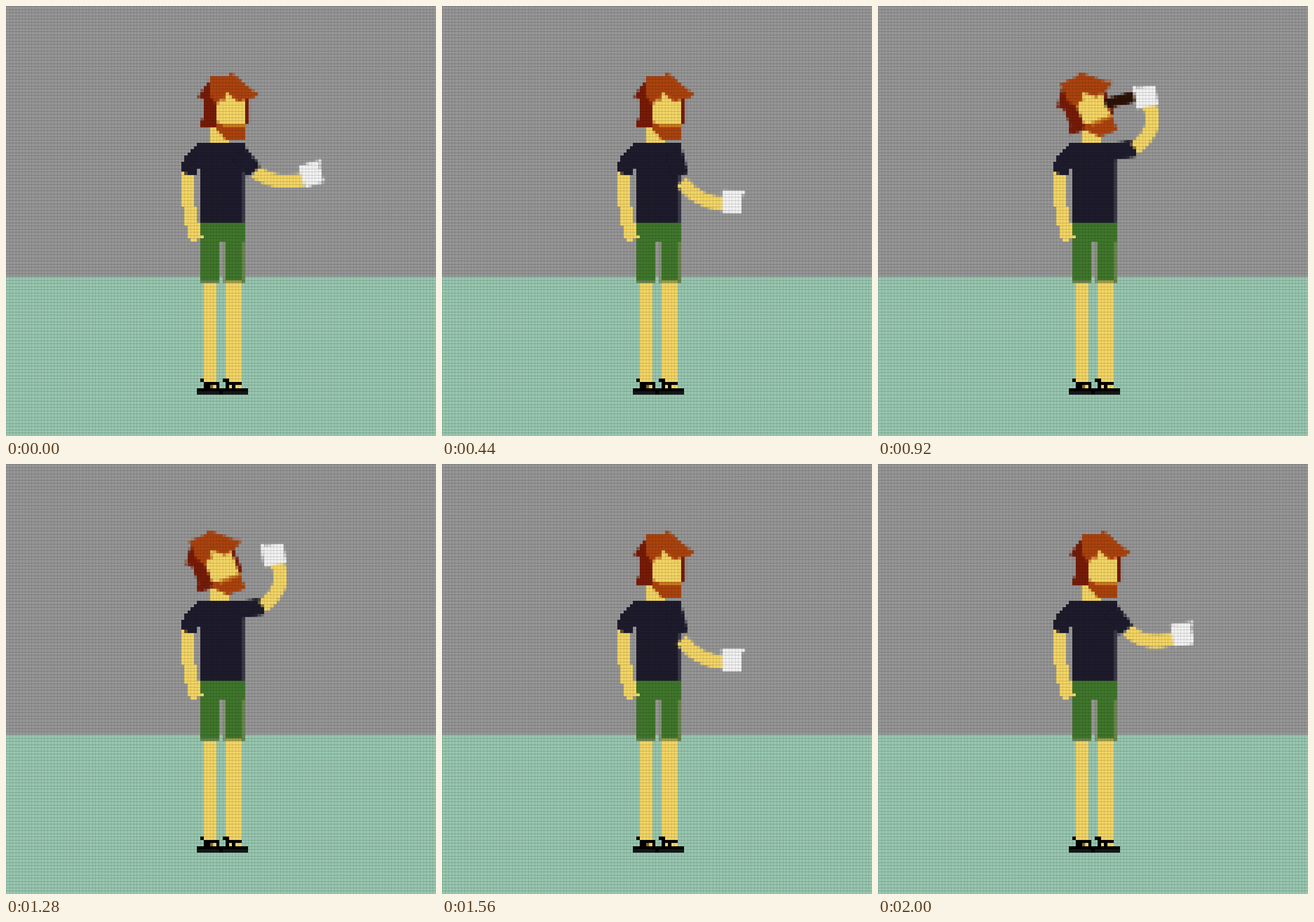
Animation of 748x748 px, one loop 2.48 s. Source, as an HTML page without scripts:

```html
<!DOCTYPE html>
<html lang="en">
<head>
<meta charset="utf-8">
<title>Coffee break</title>
<style>
  html, body { margin: 0; width: 100%; height: 100%; overflow: hidden; background: #9b9b9b; }
  svg { display: block; width: 748px; height: 748px; }

  .skin { fill: #fbdc68; }
  .shirt { fill: #1f1d2e; }
  .shorts { fill: #427a2d; }
  .hair { fill: #b1450e; }
  .back { fill: #7c1c08; }
  .lines { fill: none; stroke-width: 1496; stroke-dasharray: 1 4.5407; shape-rendering: crispEdges; }

  .sleeve, .arm, .pour { fill: none; }
  .sleeve { stroke: #1f1d2e; stroke-width: 28; }
  .arm { stroke: #fbdc68; stroke-width: 22; }
  .pour { stroke: #2e1206; stroke-width: 17; stroke-dasharray: 1 2; }
  .cup { fill: #f9f9f9; }
  .head { transform-origin: 66.7px 40.4px; }

  .head, .sleeve, .arm, .cup, .pour { animation: 2480ms linear infinite; }
  .head { animation-name: head; }
  .sleeve { animation-name: sleeve; }
  .arm { animation-name: arm; }
  .cup { animation-name: cup; }
  .pour { animation-name: pour; }

  /* rest, dip, lift, sip, lower, dip, back to rest */
  @keyframes sleeve {
    0%, 3.23% { d: path("M405 255L431 287"); animation-timing-function: ease-in-out; }
    14.5% { d: path("M404 255L410 294"); }
    17.74% { d: path("M404 255L413 294"); }
    24.19% { d: path("M402 255L443 271"); animation-timing-function: ease-out; }
    30.65%, 51.61% { d: path("M400 255L447 247"); animation-timing-function: ease-in; }
    56.45% { d: path("M402 255L443 271"); }
    62.9% { d: path("M404 255L413 294"); }
    66.13% { d: path("M404 255L410 294"); }
    69.35% { d: path("M404 255L420 292"); animation-timing-function: ease-out; }
    80.65%, 100% { d: path("M405 255L431 288"); }
  }
  @keyframes arm {
    0%, 3.23% { d: path("M435 288Q460 310 516 302"); animation-timing-function: ease-in-out; }
    14.5% { d: path("M412 304Q440 350 487 350"); }
    17.74% { d: path("M417 306Q445 343 490 344"); }
    24.19% { d: path("M443 274Q492 283 512 236"); animation-timing-function: ease-out; }
    30.65%, 51.61% { d: path("M446 247Q492 213 470 170"); animation-timing-function: ease-in; }
    56.45% { d: path("M443 274Q492 283 512 236"); }
    62.9% { d: path("M417 306Q445 343 490 344"); }
    66.13% { d: path("M412 304Q440 350 487 350"); }
    69.35% { d: path("M424 300Q450 336 500 332"); animation-timing-function: ease-out; }
    80.65%, 100% { d: path("M435 289Q465 318 516 303"); }
  }
  @keyframes cup {
    0%, 3.23% { transform: translate(531px, 292px) rotate(-15deg); animation-timing-function: ease-in-out; }
    14.5% { transform: translate(500px, 347px) rotate(5deg); }
    17.74% { transform: translate(504px, 341px) rotate(3deg); }
    24.19% { transform: translate(519px, 221px) rotate(-52deg); animation-timing-function: ease-out; }
    30.65%, 51.61% { transform: translate(465px, 158px) rotate(-98deg); animation-timing-function: ease-in; }
    56.45% { transform: translate(519px, 221px) rotate(-52deg); }
    62.9% { transform: translate(504px, 341px) rotate(0deg); }
    66.13% { transform: translate(500px, 347px) rotate(4deg); }
    69.35% { transform: translate(513px, 329px) rotate(-2deg); animation-timing-function: ease-out; }
    80.65%, 100% { transform: translate(529px, 296px) rotate(-9deg); }
  }
  @keyframes head {
    0%, 21% { transform: rotate(0deg); animation-timing-function: ease-in; }
    24.19% { transform: rotate(-4deg); }
    30.65% { transform: rotate(-20deg); }
    35%, 43% { transform: rotate(-22deg); }
    48%, 51.61% { transform: rotate(-21deg); animation-timing-function: ease-in; }
    56.45% { transform: rotate(-5deg); }
    59.68%, 100% { transform: rotate(0deg); }
  }
  @keyframes pour {
    0%, 32.26% { stroke-dashoffset: 1; }
    35.48%, 42% { stroke-dashoffset: 0; }
    46.77%, 100% { stroke-dashoffset: -1; }
  }
</style>
</head>
<body>
<svg viewBox="0 0 748 748">
  <defs>
    <path id="cols" class="lines" d="M0 0H748"/>
    <path id="rows" class="lines" d="M0 0V748"/>
    <mask id="pickX" maskUnits="userSpaceOnUse" x="0" y="0" width="748" height="748">
      <use href="#cols" stroke="#fff"/>
    </mask>
    <mask id="pickY" maskUnits="userSpaceOnUse" x="0" y="0" width="748" height="748">
      <use href="#rows" stroke="#fff"/>
    </mask>
    <filter id="soft" filterUnits="userSpaceOnUse" x="0" y="0" width="748" height="748" color-interpolation-filters="sRGB">
      <feGaussianBlur stdDeviation="1"/>
    </filter>
    <!-- grows each sampled dot to one 6px block -->
    <filter id="blocks" filterUnits="userSpaceOnUse" x="0" y="0" width="748" height="748" color-interpolation-filters="sRGB">
      <feOffset in="SourceGraphic" dx="1" result="o1"/>
      <feMerge result="x2"><feMergeNode in="o1"/><feMergeNode in="SourceGraphic"/></feMerge>
      <feOffset in="x2" dx="2" result="o2"/>
      <feMerge result="x4"><feMergeNode in="o2"/><feMergeNode in="x2"/></feMerge>
      <feOffset in="x4" dx="2" result="o3"/>
      <feMerge result="x6"><feMergeNode in="o3"/><feMergeNode in="x4"/></feMerge>
      <feOffset in="x6" dy="1" result="o4"/>
      <feMerge result="y2"><feMergeNode in="o4"/><feMergeNode in="x6"/></feMerge>
      <feOffset in="y2" dy="2" result="o5"/>
      <feMerge result="y4"><feMergeNode in="o5"/><feMergeNode in="y2"/></feMerge>
      <feOffset in="y4" dy="2" result="o6"/>
      <feMerge><feMergeNode in="o6"/><feMergeNode in="y4"/></feMerge>
    </filter>
  </defs>

  <g transform="scale(5.5407)" shape-rendering="crispEdges">
    <path fill="#9b9b9b" d="M0 0H136V85H0z"/>
    <path fill="#9ccdb5" d="M0 85H136V136H0z"/>

    <!-- legs and sandals -->
    <path class="skin" d="M62 87H66V119H62zM69 87H74V119H69z"/>
    <path d="M61 117h1v1h-1zM62 118H67V120H62zM68 117H70V118H68zM69 118H74V120H69zM60 120H76V122H60z"/>
    <path fill="#15181a" d="M60 121H67V122H60zM68 121H76V122H68z"/>
    <path class="skin" d="M65 119h1v1h-1zM70 119h1v1h-1zM72 119h2v1h-2z"/>
    <path fill="#8a6a2c" d="M64 119h1v1h-1z"/>

    <!-- shorts -->
    <path class="shorts" d="M61 68H75V74H74V86H69V74H67V86H61z"/>
    <path fill="#6c8a50" d="M74 74h1v13h-1zM61 86h6v1h-6z"/>
    <path fill="#a3a44a" d="M69 86h5v1h-5z"/>
    <path fill="#899a78" d="M68 74h1v13h-1z"/>

    <!-- left arm, neck, shirt -->
    <path class="skin" d="M55 52H59V63H60V68H61V72H62V73H60V74H58V73H57V69H56V63H55z"/>
    <path class="skin" d="M64 38H70V43H64z"/>
    <path class="shirt" d="M60 43H75V68H61V51H60V53H57V52H55V49H56V47H57V46H58V45H59V44H60z"/>
    <path fill="#3d3b4b" d="M74 47h1v21h-1z"/>
    <path fill="#5d4d32" d="M56 52h1v1h-1z"/>
  </g>

  <g filter="url(#blocks)">
    <g mask="url(#pickY)">
      <g mask="url(#pickX)">
        <g transform="translate(-2.3 -2.3)" filter="url(#soft)">
          <g transform="scale(5.5407)">
            <g class="head">
              <path class="back" d="M64 23.5L62 26L60.3 28.4L62 29.3V35L61 36.5V38H67L69 27L67 24zM74.5 29H76V37H74.5z"/>
              <path class="skin" d="M68 26.5H75V37.5H66V31z"/>
              <path class="hair" d="M64 22H70L70.5 21L72 22L77 26.4L79.2 27.4L77.5 28.7L75 29.4L73 30.2L69.2 27L68.5 29.9L67.3 29.4L66 31L64 28z"/>
              <path class="hair" d="M65.9 35.8L67 37H75V42H69.2L66 38.4z"/>
              <path fill="#cf7a1e" d="M68 37H75V38H68z"/>
            </g>
          </g>
          <path class="pour" pathLength="1" d="M448 157L395 170"/>
          <path class="sleeve" d="M405 255L431 287"/>
          <path class="arm" d="M435 288Q460 310 516 302"/>
          <path class="cup" d="M-18 -19H22L17 -11V19H-17z"/>
        </g>
      </g>
    </g>
  </g>

  <!-- screen mesh -->
  <path fill-opacity=".03" d="M0 0H748V748H0z"/>
  <g stroke="#000">
    <use href="#cols" stroke-opacity=".1"/>
    <use href="#rows" stroke-opacity=".16"/>
  </g>
</svg>
</body>
</html>
```
